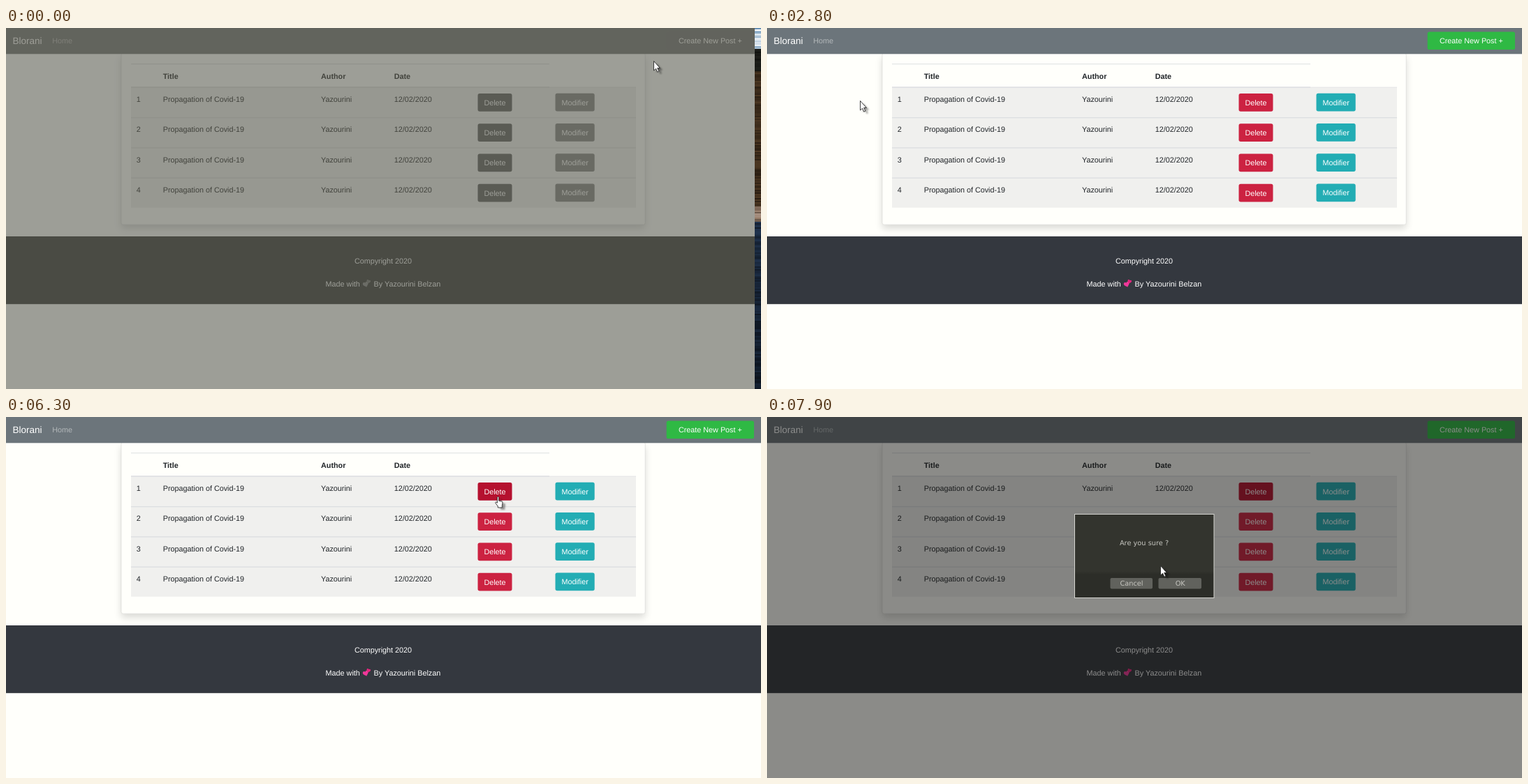
These frames come from a looping animation (1081 by 518 pixels, 8 s). An HTML page:

```html
<!DOCTYPE html>
<html lang="en">
<head>
<meta charset="utf-8">
<title>Posts</title>
<style>
html, body { margin: 0; width: 100%; height: 100%; overflow: hidden; }
svg { display: block; width: 1081px; height: 518px; }
text { font: 10.81px "Liberation Sans", Arial, sans-serif; text-rendering: geometricPrecision; white-space: pre; }
.mid { text-anchor: middle; }
.bold { font-weight: bold; }
#brand { font-size: 13.51px; }
#dialog text { font: 9.8px "DejaVu Sans", sans-serif; fill: #c6c6c0; text-anchor: middle; }
.pointer { fill: #fff; stroke: #2b2b2b; stroke-width: .9; stroke-linejoin: round; }
</style>
</head>
<body>
<svg viewBox="0 0 1081 518">
  <defs>
    <linearGradient id="panel" x2="0" y2="1">
      <stop offset=".68" stop-color="#33342e"/><stop offset=".72" stop-color="#2c2d28"/>
    </linearGradient>
    <filter id="blur" x="-10%" y="-20%" width="120%" height="140%"><feGaussianBlur stdDeviation="5.4"/></filter>
    <filter id="soft" x="-50%" y="-50%" width="200%" height="200%"><feGaussianBlur stdDeviation=".9"/></filter>
    <!-- Greys with low contrast, slightly warm -->
    <filter id="faded" filterUnits="userSpaceOnUse" x="0" y="0" width="1072" height="518" color-interpolation-filters="sRGB">
      <feColorMatrix values=".133 .193 .094 0 .196  .133 .193 .094 0 .2  .133 .193 .094 0 .174  0 0 0 1 0"/>
    </filter>
    <path id="arrow" d="M.5 .5V14L3.6 11.3 5.8 16.2 7.9 15.2 5.7 10.5H9.4Z"/>
    <path id="hand" d="M3.4 1.6Q3.4.5 4.5.5T5.6 1.6V6.2L9.7 7.1Q11.1 7.5 11 9L10.3 13V16H4.3V14L.9 9.6Q.3 8.2 1.7 8L3.4 9.2Z"/>
    <path id="love" d="M0 1.2C-1-.8-4-.2-4 2.2-4 4.4-1 5.8 0 7.4 1 5.8 4 4.4 4 2.2 4-.2 1-.8 0 1.2Z"/>
  </defs>
  <g id="page"></g>
  <g id="wall"></g>
  <rect id="status" y="517" width="96" height="1" fill="#45494c"/>
  <g id="dialog">
    <rect width="1081" height="518" fill="#111110" opacity=".488"/>
    <rect x="440.5" y="139.5" width="199.5" height="120" fill="url(#panel)" stroke="#d4d4cf"/>
    <rect x="491.5" y="231" width="60.5" height="15.5" rx="2" fill="#61625d"/>
    <rect x="560.5" y="231" width="61.5" height="15.5" rx="2" fill="#61625d"/>
    <text x="540" y="184">Are you sure ?</text>
    <text x="522" y="242.2">Cancel</text>
    <text x="591.7" y="242.2">OK</text>
  </g>
  <g id="cursor">
    <use class="shape" x="4" y="3" opacity=".38" filter="url(#soft)"/>
    <use class="shape pointer"/>
  </g>
</svg>
<script>
const PAGE = '#fffffb', LINE = '#dddfe1', INK = '#212529', RED = '#cc2241', DARK_RED = '#b5112f';
const HOME = '#b3b8ba', HOME_HOVER = '#d3d6d8';
const $ = id => document.getElementById(id);
const rect = (x, y, w, h, fill, more = '') =>
  `<rect x="${x}" y="${y}" width="${w}" height="${h}" fill="${fill}" ${more}/>`;
const text = (x, y, str, fill = INK, more = '') =>
  `<text x="${x}" y="${y}" fill="${fill}" ${more}>${str}</text>`;
const button = (x, y, w, label, fill, id = '') =>
  rect(x, y, w, 25.7, fill, `rx="2.7" ${id}`) +
  text(x + w / 2, y + 16.9, label, '#fff', 'class="mid"');
const heart = (x, y, size, angle, fill) =>
  `<use href="#love" transform="translate(${x} ${y}) rotate(${angle}) scale(${size})" fill="${fill}"/>`;

function buildPage() {
  let out = rect(0, 0, 1081, 518, PAGE)
    + rect(165, 43, 750, 244.5, '#000', 'opacity=".15" filter="url(#blur)"')
    + rect(165, 36, 750.2, 246.2, PAGE, 'rx="2.7" stroke="#dcdcd9" stroke-width=".7"')
    + rect(0, 0, 1081, 37.3, '#6c757b')
    + text(9.5, 23, 'Blorani', '#fff', 'id="brand"')
    + text(66.3, 22.4, 'Home', HOME, 'id="home"')
    + button(945.7, 5.4, 125.3, 'Create New Post +', '#2fb944')
    + rect(179, 51.2, 599, 1, LINE)
    + rect(179, 85, 723, 172.8, '#f0f0ee')
    + rect(179, 84.3, 599, 1.4, LINE);
  const columns = { Title: 224.7, Author: 451, Date: 555.7 };
  const post = { Title: 'Propagation of Covid-19', Author: 'Yazourini', Date: '12/02/2020' };
  for (const name in columns) out += text(columns[name], 72.7, name, INK, 'class="bold"');
  for (let i = 0; i < 4; i++) {
    const y = 85 + i * 43.27;
    out += rect(179, y - .3, 723, i ? 1.4 : .7, LINE) + text(186.8, y + 21.2, i + 1);
    for (const name in columns) out += text(columns[name], y + 21.2, post[name]);
    out += button(675.5, y + 9, 49, 'Delete', RED, i ? '' : 'id="delete"')
      + button(786.5, y + 8.7, 56.2, 'Modifier', '#23adb4');
  }
  return out + rect(0, 299, 1081, 97.2, '#34383f')
    + text(540, 338.4, 'Compyright 2020', '#fff', 'class="mid"')
    + text(457.6, 370.7, 'Made with', '#fff')
    + heart(514, 364.6, 1, -18, '#f0389a')
    + heart(519.6, 361.5, .72, 14, '#e8257f')
    + text(526.6, 370.7, 'By Yazourini Belzan', '#fff');
}

// Sliver of desktop: sky, rock, a pale shore, then rippling sea
function buildWall() {
  let seed = 7, out = '';
  const random = () => (seed = seed * 16807 % 2147483647) / 2147483647;
  for (let y = 0; y < 518; y += 2) {
    const [hue, sat, light] = y < 30 ? [208, 35, 80] : y < 62 ? [80, 8, 9]
      : y < 255 ? [30, 38, 17] : y < 278 ? [25, 18, 50] : [215, 42, 24 - y / 40];
    out += rect(1072, y, 9, 2, `hsl(${hue} ${sat}% ${light * (.7 + .6 * random())}%)`);
  }
  return out;
}
$('page').innerHTML = buildPage();
$('wall').innerHTML = buildWall();

// Pointer moves: start ms, 100 ms steps, end point, optional bend point
const moves = [
  [600, 1, [854, 48]],
  [800, 3, [637, 71], [513, 75]],
  [2400, 5, [133, 104], [-149, -69]],
  [3000, 1, [383, 104]],
  [3300, 4, [182, 108], [300, 84]],
  [3900, 1, [137, 77]],
  [4000, 5, [55, 17], [-31, 20]],
  [4600, 2, [79, 15]],
  [5600, 1, [113, 24]],
  [5700, 7, [700, 114], [380, 90]],
  [6600, 4, [688, 106], [660, 108]],
  [7700, 3, [563, 213], [640, 150]]
];
function pointerAt(t) {
  let from = [927, 47];
  for (const [start, steps, to, bend = to] of moves) {
    if (t < start) break;
    const p = Math.min(1, (Math.floor((t - start) / 100) + 1) / steps), q = 1 - p;
    from = from.map((a, i) => q * q * a + 2 * q * p * bend[i] + p * p * to[i]);
  }
  return from;
}

const show = (id, on) => $(id).style.display = on ? '' : 'none';
const between = (t, a, b) => t >= a && t < b;

function draw(t) {
  const faded = t < 1800, onHome = between(t, 4600, 5600);
  $('page').style.filter = faded ? 'url(#faded)' : 'none';
  show('wall', faded);
  show('dialog', t >= 7400);
  show('status', between(t, 4600, 5700));
  $('home').setAttribute('fill', between(t, 4600, 5700) ? HOME_HOVER : HOME);
  $('delete').setAttribute('fill', t >= 6300 ? DARK_RED : RED);
  $('cursor').setAttribute('transform', `translate(${pointerAt(t)})`);
  const shape = onHome || between(t, 6300, 7700) ? '#hand' : '#arrow';
  document.querySelectorAll('.shape').forEach(el => el.setAttribute('href', shape));
}

const start = performance.now();
function tick() {
  draw((performance.now() - start) % 8000);
  requestAnimationFrame(tick);
}
tick();
</script>
</body>
</html>
```
